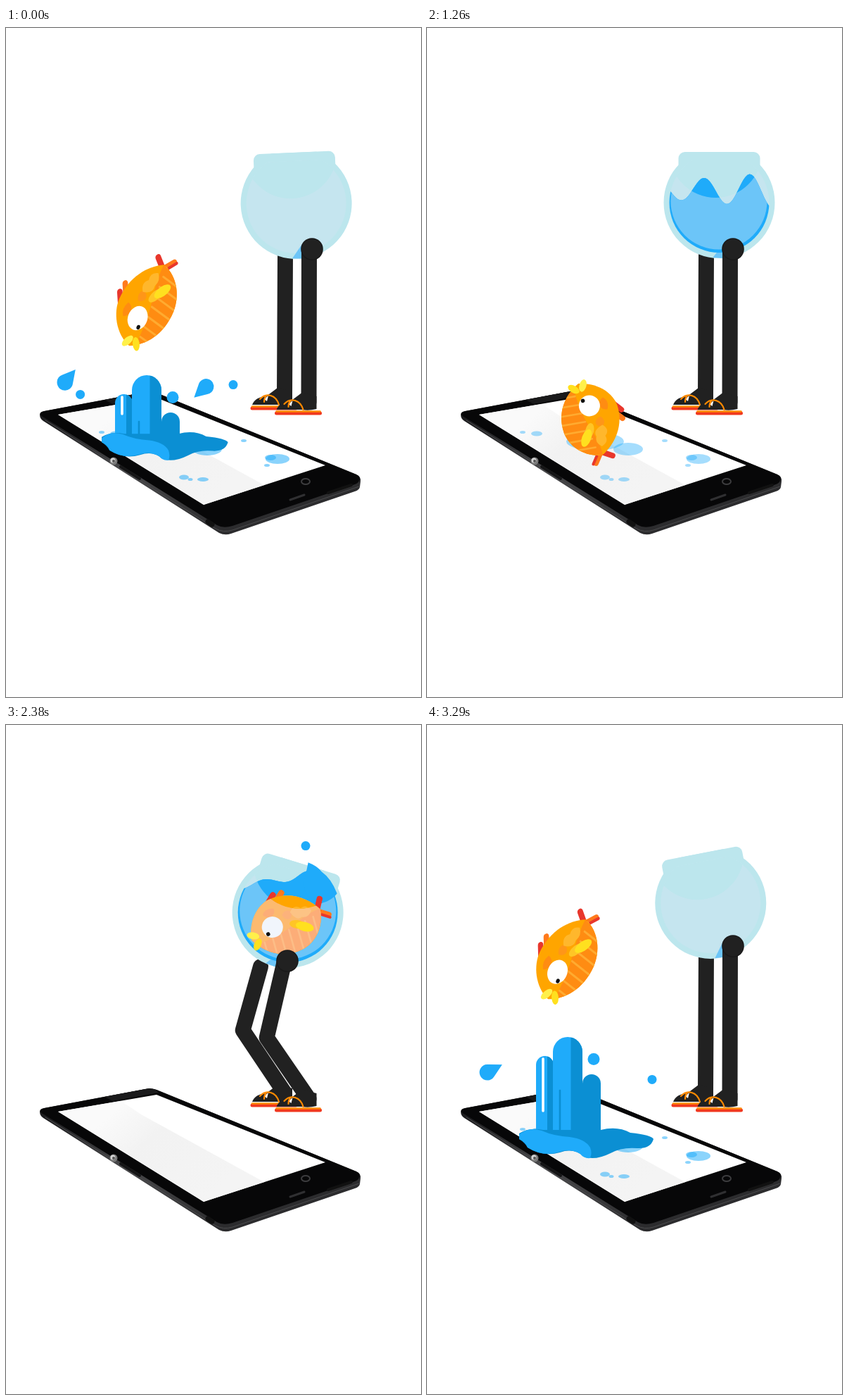
Animation, 590 px wide and 950 px high, one loop 3360 ms. Source, as an HTML page with a canvas:

```html
<!DOCTYPE html>
<html lang="en">
<head>
<meta charset="utf-8">
<title>Fish, bowl and phone</title>
<style>
html, body { margin: 0; width: 590px; height: 950px; overflow: hidden; background: #fff; }
canvas { display: block; }
</style>
</head>
<body>
<canvas id="stage" width="590" height="950"></canvas>
<script>
const c = document.getElementById('stage').getContext('2d');
const LOOP = 3360, STEP = 70, TAU = Math.PI * 2, RAD = Math.PI / 180;
const BLUE = '#1fabfa', LIGHT = '#6cc5f8', DEEP = '#0b8fd3', GLASS = '#bce6ed', INNER = '#c5e5ef';
const INK = '#212121', ORANGE = '#ff8c12', GOLD = '#ffa500', RED = '#e8372c';

// Tables cover one loop, from 700 ms to 4060 ms.
const FISH = [ // time, x, y, turn
  [700, 165, 520, -25], [980, 206, 540, 8], [1260, 233, 555, 68], [1400, 268, 365, 108],
  [1540, 308, 215, 147], [1680, 341, 139, 175], [1750, 351, 137, 182], [1890, 378, 165, 228],
  [2030, 398, 258, 275], [2380, 397, 283, 332], [2590, 380, 285, 358], [2730, 335, 283, 383],
  [2870, 282, 249, 406], [3010, 228, 238, 352], [3150, 204, 258, 307], [3290, 198, 333, 293],
  [3360, 199, 394, 291], [3500, 173, 490, 294], [3850, 160, 497, 300], [4060, 165, 520, 335]];
const STRETCH = [[700, 1], [1260, 1], [1400, 1.1], [1680, 1], [3010, 1], [3290, 1.17], [3360, 1.17], [3500, .98], [4060, 1]];
const HIP = [ // time, x, y, bowl turn
  [700, 435, 314, 0], [1400, 435, 314, 0], [1750, 438, 317, -12], [2030, 432, 325, 8],
  [2380, 400, 335, 17], [2590, 395, 330, -6], [2870, 410, 319, -57], [3010, 422, 316, -48],
  [3150, 431, 314, -27], [3290, 435, 314, -11], [3360, 435, 314, -2.5], [3500, 435, 314, 3],
  [3850, 435, 314, 0], [4060, 435, 314, 0]];
const WATER = [ // time, level, wave, tilt
  [700, 30, 10, 0], [1260, -18, 20, 0], [1750, -47, 4, 0], [2030, -40, 10, 0], [2380, -48, 5, -27],
  [2590, -35, 7, 10], [2870, 12, 3, 92], [3010, 50, 2, 92], [3150, 85, 0, 60], [3640, 78, 0, 0],
  [3850, 51, 5, 0], [4060, 30, 10, 0]];
const POUR = [ // time, head x, head y, radius, tail x, tail y
  [2730, 268, 300, 16, 305, 300], [2800, 238, 307, 40, 308, 298], [2870, 203, 318, 48, 312, 297],
  [2940, 196, 385, 48, 272, 312], [3080, 197, 545, 42, 215, 430]];
const SINK = [[3080, 130], [3150, 60], [3220, 12], [3290, 0], [3360, 50], [3500, 150]];
const BASE = [[3080, .5], [3150, .85], [3290, 1], [3360, .94], [3570, .5]];
const WET = [[700, .6], [1260, .4], [1750, .15], [1990, 0], [3080, 0], [3150, .5], [3360, .52], [3640, .66], [4060, .6]];
const SPIKE = [[2170, 0], [2380, 1], [2520, 0]];
const DROPS = [ // start, end, x, y, x, y, lift, radius
  [3350, 3920, 106, 520, 83, 577, 8, 6.5],
  [3285, 3425, 237, 471, 237, 571, 0, 8.5],
  [3640, 3920, 218, 512, 193, 582, 0, 9],
  [3220, 3570, 317, 505, 332, 545, 15, 6.5],
  [2240, 2590, 440, 205, 405, 215, 39, 6.5]];
const TEARS = [ // the same, then first and last direction
  [3220, 3890, 88, 485, 68, 636, 20, 11.3, -5, -60],
  [3345, 3890, 283, 509, 334, 592, 20, 11, 126, 231]];
const PUDDLES = [[239, 587, 41, 13], [286, 598, 21, 9], [156, 576, 8, 3.5], [136, 574, 4, 2], [253, 638, 7, 3.5],
  [280, 641, 8, 3], [262, 641, 3.5, 2], [338, 586, 4, 2], [386, 612, 17, 7], [376, 610, 8, 4], [371, 621, 4, 2]];

// Values of a table at time t, or null outside it.
function at(rows, t) {
  if (t < rows[0][0] || t > rows[rows.length - 1][0]) return null;
  const i = Math.max(1, rows.findIndex(r => r[0] >= t));
  const a = rows[i - 1], b = rows[i], k = (t - a[0]) / (b[0] - a[0]);
  return a.slice(1).map((v, j) => v + (b[j + 1] - v) * k);
}

function fill(color, shape) {
  c.fillStyle = color;
  if (typeof shape === 'string') return c.fill(new Path2D(shape));
  c.beginPath(); shape(); c.fill();
}
function line(color, width, d) {
  c.strokeStyle = color; c.lineWidth = width;
  c.stroke(new Path2D(d));
}
function layer(draw, x = 0, y = 0, turn = 0, sx = 1, sy = 1) {
  c.save(); c.translate(x, y); c.rotate(turn * RAD); c.scale(sx, sy);
  draw(); c.restore();
}
function clip(shape) { c.beginPath(); shape(); c.clip(); }
const disc = (color, x, y, r) => fill(color, () => c.arc(x, y, r, 0, TAU));
const oval = (color, x, y, rx, ry, turn = 0) => fill(color, () => c.ellipse(x, y, rx, ry, turn * RAD, 0, TAU));

function phone() {
  const edge = c.createLinearGradient(60, 560, 300, 715);
  edge.addColorStop(0, '#1c1c1e'); edge.addColorStop(.45, '#48484a'); edge.addColorStop(1, '#2c2c2e');
  fill(edge, 'M48 549Q48 545 54 544L198 517Q206 515 214 518L498 634Q505 637 504 644L503 652Q502 656 496 658L320 718Q311 721 303 717L53 558Q48 555 48 549Z');
  fill('#070708', 'M49 548Q49 545 55 544L198 517Q206 515 214 518L498 634Q505 637 502 643Q501 646 496 648L322 707Q309 711 300 706L54 553Q49 551 49 548Z');
  fill('#1a1a1b', 'M140 528L198 517Q206 515 213 518L217 522L152 534Z');
  line('#4c4c4e', 1, 'M56 557L298 711Q309 717 322 713L502 651');
  fill('#fff', 'M74 549L214 525L454 621L281 677Z');
  const shade = c.createLinearGradient(165, 537, 290, 670);
  shade.addColorStop(0, '#fafafa'); shade.addColorStop(.35, '#f2f2f2'); shade.addColorStop(1, '#f4f4f4');
  fill(shade, 'M74 549L163 534Q182 546 192 553L367 649L281 677Z');
  disc('#777', 153, 615, 5.5); disc('#d4d4d4', 152, 614, 3.5); disc('#555', 153, 615, 2);
  line('#151516', 4, 'M163 623L190 640');
  line('#111', 7, 'M287 701L293 705');
  line('#303032', 3, 'M404 670L424 663');
  line('#111', 4, 'M458 660L491 649');
  c.strokeStyle = '#3c3c3e'; c.lineWidth = 2;
  c.beginPath(); c.ellipse(426, 644, 6, 4, 0, 0, TAU); c.stroke();
}

function puddles(t) {
  c.globalAlpha = at(WET, t)[0];
  PUDDLES.forEach((p, i) => { if (i || t < 3000 || t > 3360) oval(BLUE, ...p); });
  c.globalAlpha = 1;
}

// Two-bone leg whose knee always bends to the left.
function leg(x, y, fx, fy, thigh, shin) {
  const dx = fx - x, dy = fy - y, d = Math.min(Math.hypot(dx, dy), thigh + shin);
  const bend = Math.acos(Math.min(1, (thigh * thigh + d * d - shin * shin) / (2 * thigh * d)));
  const a = Math.atan2(dy, dx) + bend;
  line(INK, 22, `M${x} ${y}L${x + thigh * Math.cos(a)} ${y + thigh * Math.sin(a)}L${fx} ${fy - 3}`);
}

function foot(x, y) {
  layer(() => {
    fill(INK, 'M-46 7Q-42 -4 -26 -5L-10 -17L11 -12V6Q0 9 -10 7Z');
    fill('#fff', 'M-29 -1L-23 -6L-25 2Z');
    line('#ff8a00', 2.2, 'M-35 -1C-26 -11 -12 -7 -8 7M-26 -6Q-29 -2 -29 3');
    line('#f0381f', 5, 'M-46 12H16');
    line('#ff8a00', 2.4, 'M-46 9.5H16');
  }, x, y);
}

function bowlCenter([x, y, turn]) {
  const s = Math.sin(turn * RAD), k = Math.cos(turn * RAD);
  return [x - 19.5 * k + 66 * s, y - 19.5 * s - 66 * k];
}
const cap = () => c.arc(-5, -73, 66, 0, TAU);

function bowl(t, turn) {
  layer(() => {
    clip(() => c.rect(-90, -72, 180, 170));
    disc(GLASS, 0, 0, 79);
  });
  fill(GLASS, () => c.roundRect(-58, -72, 116, 40, 9));
  layer(() => {
    clip(() => c.rect(-90, -60, 180, 150));
    disc(INNER, 0, 0, 71);
    clip(() => c.arc(0, 0, 71, 0, TAU));
    fill(GLASS, cap);
  });
  if (turn > -30) fill(LIGHT, 'M-9 78L6 58V79Z');

  const [level, wave, tilt] = at(WATER, t);
  if (level > 74) return;
  const phase = (t - 1260) * .006;
  layer(() => {
    clip(() => c.arc(0, 0, 71, 0, TAU));
    c.rotate(tilt * RAD);
    clip(() => {
      c.moveTo(-95, 95);
      for (let x = -95; x <= 95; x += 3)
        c.lineTo(x, level - wave * Math.cos((x + 22) / 65 * TAU + phase) * (.95 + .004 * x));
      c.lineTo(95, 95);
    });
    c.rotate(-tilt * RAD);
    disc(BLUE, 0, 0, 72);
    disc(LIGHT, -.5, -2, 68.5);
    fill(BLUE, cap);
  });
}

function fish(veil) {
  line(RED, 8, 'M48 5L60 -9');
  line('#ff7a1c', 8, 'M50 6L61 17');
  line(RED, 4, 'M52 12L61 21');
  line('#ff7a1c', 8, 'M4 -35L16 -42');
  line(RED, 8, 'M-8 -38L4 -45');
  const shape = new Path2D('M-53 -2C-45 -28 -22 -43 -4 -42C25 -40 45 -20 54 4C46 30 25 43 5 43C-25 42 -45 22 -53 -2Z');
  c.fillStyle = GOLD; c.fill(shape);
  layer(() => {
    c.clip(shape);
    fill(ORANGE, 'M-60 5Q-20 12 10 6T60 4V50H-60Z');
    for (let x = -42; x < 50; x += 13) line('#ffab30', 2.6, `M${x + 4} 9L${x - 4} 46`);
    fill(ORANGE, 'M-22 -27Q-14 -34 -4 -27Q-6 -18 -14 -19Q-20 -20 -22 -27Z');
    fill('#ff9618', 'M2 -14Q10 -20 16 -12Q14 -4 8 -4Q2 -6 2 -14Z');
    fill('#ffb72c', 'M14 -12Q24 -20 30 -10Q40 -12 42 0Q34 8 26 2Q16 4 14 -12Z');
    if (veil) { c.fillStyle = 'rgba(249,208,222,.5)'; c.fillRect(-60, -50, 120, 100); }
  });
  oval('#ffc526', 15, 8, 11, 6, 35);
  oval('#ffe01f', 23, 16, 13, 6.5, 42);
  oval('#ffe01f', -48, 7, 9, 5, -38);
  oval('#fff04a', -48, -7, 9, 5, 38);
  disc(veil ? '#f1f5fc' : '#fff', -18, -5, 15);
  disc('#111', -28, 1, 2.8);
}

function pour(t) {
  const p = at(POUR, t);
  if (!p) return;
  const [x, y, r, tx, ty] = p, X = k => x + k * r, Y = k => y + k * r;
  const d = `M${X(-1)} ${Y(.2)}C${X(-1)} ${Y(-.7)} ${X(-.3)} ${Y(-1.2)} ${X(.65)} ${Y(-1.19)}` +
    `Q${(X(.65) + tx) / 2 + 8} ${(Y(-1.19) + ty) / 2 - 10} ${tx} ${ty}` +
    `Q${X(1.1)} ${Y(-.5)} ${X(.94)} ${Y(-.25)}C${X(1.05)} ${Y(.5)} ${X(.6)} ${Y(.97)} ${x} ${Y(.97)}` +
    `C${X(-.6)} ${Y(.97)} ${X(-1)} ${Y(.55)} ${X(-1)} ${Y(.2)}Z`;
  fill(BLUE, d);
  layer(() => { c.clip(new Path2D(d)); disc(DEEP, X(1.1), Y(1), r * .98); });
}

function column(left, right, top, color, shadeFrom) {
  const w = right - left;
  const shape = () => c.roundRect(left, top, w, 200, [w / 2, w / 2, 0, 0]);
  fill(color, shape);
  if (!shadeFrom) return;
  layer(() => { clip(shape); fill(DEEP, () => c.rect(shadeFrom, top, w, 200)); });
}

function splash(t) {
  const size = at(BASE, t), sink = at(SINK, t);
  if (!size) return;
  if (sink) layer(() => {
    const d = sink[0];
    clip(() => c.rect(100, 400, 200, 178));
    column(221, 247, 496 + d, DEEP);
    column(155, 180, 470 + d, BLUE, 171);
    column(179, 221, 443 + d, BLUE, 204.5);
    if (d < 70) line('#fff', 3.6, `M165 ${474 + d}V548`);
    line(DEEP, 2.6, `M189 ${519 + d * .8}V580`);
  });
  layer(() => {
    fill(DEEP, 'M-84 -14Q-70 -23 -50 -19H32Q56 -25 74 -15Q104 -12 107 -6Q103 8 84 7Q62 5 46 14Q24 25 8 19Q-6 6 -26 13Q-50 20 -72 6Q-76 -1 -84 -6Z');
    fill(BLUE, 'M-84 -12Q-72 -24 -52 -18Q-34 -10 -12 -9Q10 -6 17 6Q20 14 17 21Q8 22 3 15Q-12 7 -26 12Q-50 20 -72 6Q-75 -2 -84 -6Z');
  }, 215, 594, 0, size[0], size[0]);
}

// Position on a thrown arc, or null when it is not in the air.
function thrown(t, [start, end, x0, y0, x1, y1, lift]) {
  const k = (t - start) / (end - start);
  return k < 0 || k > 1 ? null : [x0 + (x1 - x0) * k, y0 + (y1 - y0) * k - 4 * lift * k * (1 - k), k];
}

function drops(t) {
  for (const d of DROPS) {
    const p = thrown(t, d);
    if (p) disc(BLUE, p[0], p[1], d[7]);
  }
  for (const d of TEARS) {
    const p = thrown(t, d), r = d[7];
    if (p) layer(() => fill(BLUE, () => {
      c.arc(0, 0, r, 1, TAU - 1);
      c.lineTo(r * 2.1, 0);
    }), p[0], p[1], d[8] + (d[9] - d[8]) * Math.min(1, p[2] * 4));
  }
}

function draw(time) {
  const t = time < 700 ? time + LOOP : time;
  c.fillStyle = '#fff'; c.fillRect(0, 0, 590, 950);
  c.lineCap = c.lineJoin = 'round';
  const hip = at(HIP, t), [hx, hy, turn] = hip, [bx, by] = bowlCenter(hip);
  const [long] = at(STRETCH, t), pose = [...at(FISH, t), long, 1 / Math.sqrt(long)];
  const inside = t > 1960 && t < 2730;

  phone();
  puddles(t);
  leg(hx - 38, hy + 8, 396, 525, 94, 109);
  foot(396, 528);
  layer(() => bowl(t, turn), bx, by, turn);

  const spike = at(SPIKE, t);
  if (spike) layer(() => fill(BLUE, 'M-21 -51Q-8 -46 -2 -38Q12 -28 20 -7Q10 6 -10 8Q-28 -4 -27 -24Q-24 -36 -21 -51Z'), bx + 50, by - 20, 0, spike[0], spike[0]);
  pour(t);
  splash(t);
  layer(() => fish(inside), ...pose);
  // The part of the fish in the upper water keeps its full colour.
  if (inside) layer(() => {
    layer(() => { c.beginPath(); cap(); }, bx, by, turn);
    c.clip();
    layer(() => fish(false), ...pose);
  });
  drops(t);

  leg(hx - 4, hy, 430.5, 534, 112, 108);
  disc('#191919', hx, hy, 15.8);
  disc(INK, hx, hy, 14.5);
  foot(430.5, 535);
}

const start = performance.now();
function tick() {
  const t = (performance.now() - start) % LOOP;
  draw(Math.floor(t / STEP) * STEP);
  requestAnimationFrame(tick);
}
tick();
</script>
</body>
</html>
```
